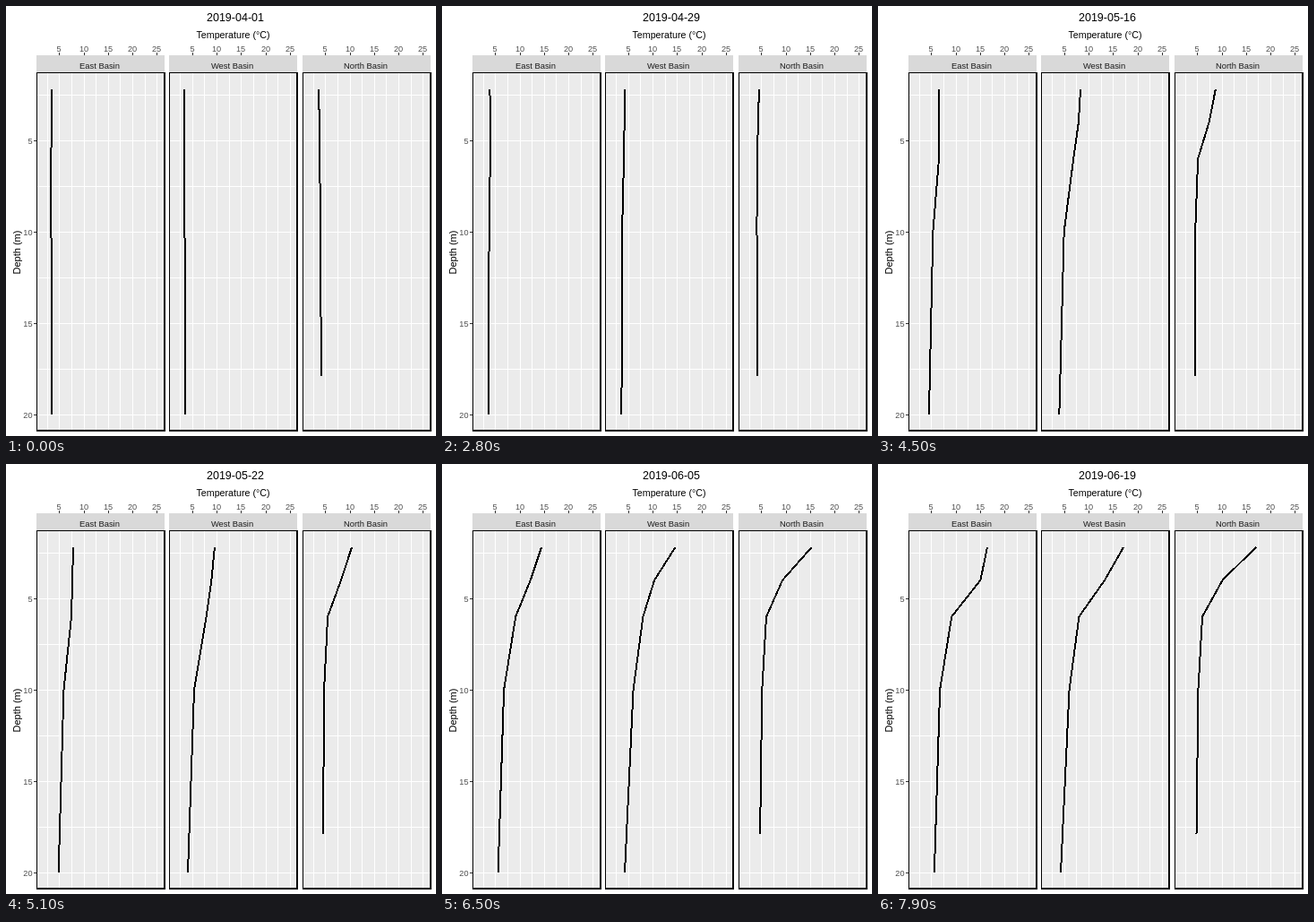
These frames come from a looping animation (480x480 px, 8000 ms). An HTML page:

```html
<!DOCTYPE html>
<html lang="en">
<head>
<meta charset="utf-8">
<title>Temperature profiles</title>
<style>
  html, body { margin: 0; width: 100%; height: 100%; overflow: hidden; background: #fff; }
  svg { display: block; width: 100vw; height: 100vh; }
  text { font-family: "Liberation Sans", Arial, sans-serif; text-anchor: middle; }
  .tick { font-size: 9.2px; fill: #4d4d4d; }
  .strip { font-size: 9.4px; fill: #1a1a1a; }
  .crisp { shape-rendering: crispEdges; }
</style>
</head>
<body>
<svg id="chart" viewBox="0 0 480 480"></svg>
<script>
const DAY_MS = 100, DAYS = 80, SPRING = 24;
const START = Date.UTC(2019, 3, 1);
const TOP = 74, BOTTOM = 475, WIDTH = 144, PER_DEGREE = 5.448;
const chart = document.getElementById("chart");

const clamp01 = value => Math.min(1, Math.max(0, value));
const lerp = (a, b, t) => a + (b - a) * t;

// Steady warming from the start of spring until the given day.
const warming = (from, to, until) => day =>
  lerp(from, to, clamp01((day - SPRING) / (until - SPRING)));

// Surface temperature on a few days, joined by straight lines.
const weatherDays = [SPRING, 38, 51, 59, 68, 71, 79];
const weather = (...temps) => day => {
  const next = Math.max(1, weatherDays.findIndex(key => key >= day));
  const from = weatherDays[next - 1];
  return lerp(temps[next - 1], temps[next], clamp01((day - from) / (weatherDays[next] - from)));
};

// Share of the surface warmth that reaches 4 m rises and falls with the wind.
const wind = (mean, swing, peak, period) => day =>
  mean + swing * Math.cos(2 * Math.PI * (day - peak) / period);

const basins = [
  { name: "East Basin", left: 34, floor: 20,
    surface: weather(3.4, 5.25, 7.9, 11.9, 15.8, 16.8, 16.5),
    mixing: wind(0.63, 0.18, 59, 20),
    at6: warming(3.38, 9.2, 62), at10: warming(3.38, 6.8, 60), atFloor: warming(3.47, 5.65, 66) },
  { name: "West Basin", left: 182, floor: 20,
    surface: weather(3.35, 6.9, 9.6, 12, 16, 17.05, 17.15),
    mixing: wind(0.54, 0.19, 43, 46),
    at6: warming(3.47, 8.05, 52), at10: warming(3.47, 6.05, 60), atFloor: warming(3.56, 4.3, 60) },
  { name: "North Basin", left: 331, floor: 17.9,
    surface: weather(3.65, 6.8, 10.45, 13.85, 16.1, 14.95, 17.05),
    mixing: wind(0.5, 0.17, 38, 66),
    at6: warming(3.9, 6.05, 60), at10: warming(4, 5.2, 66), atFloor: warming(4.2, 4.85, 70) }
];

const depthY = depth => 150 + 20.4 * (depth - 5);
const tempX = (basin, degrees) => basin.origin + PER_DEGREE * degrees;

function add(tag, attrs, content = "") {
  const node = document.createElementNS("http://www.w3.org/2000/svg", tag);
  for (const key in attrs) node.setAttribute(key, attrs[key]);
  node.textContent = content;
  return chart.appendChild(node);
}
const box = (x, y, width, height, fill) =>
  add("rect", { x, y, width, height, fill, class: "crisp" });

function drawPanel(basin, index) {
  const { left, name } = basin;
  basin.origin = 32.08 + 148.5 * index;
  box(left, 55, WIDTH - 1, TOP - 55, "#d9d9d9");
  add("text", { x: left + 70.5, y: 70, class: "strip" }, name);
  box(left, TOP, WIDTH, BOTTOM - TOP, "#ebebeb");

  for (let depth = 2.5; depth <= 20; depth += 2.5)
    box(left, Math.round(depthY(depth)), WIDTH, 1, "#fff");
  for (let degrees = 2.5; degrees <= 25; degrees += 2.5) {
    const x = Math.round(tempX(basin, degrees));
    box(x, TOP, 1, BOTTOM - TOP, "#fff");
    if (degrees % 5 === 0) {
      box(x, 52, 1, 3, "#333");
      add("text", { x, y: 51, class: "tick" }, degrees);
    }
  }

  basin.line = add("polyline", {
    fill: "none", stroke: "#000", "stroke-width": 2, "stroke-linejoin": "round", class: "crisp"
  });
  box(left, TOP, WIDTH, 1, "#000");
  box(left, TOP, 1, BOTTOM - TOP, "#000");
  box(left + WIDTH - 2, TOP, 2, BOTTOM - TOP, "#000");
  box(left, BOTTOM - 2, WIDTH, 2, "#000");
}

const title = add("text", { x: 256, y: 17, "font-size": 12.5 });
add("text", { x: 253.5, y: 36, "font-size": 10.7 }, "Temperature (°C)");
add("text", { transform: "translate(15.5 275) rotate(-90)", "font-size": 11 }, "Depth (m)");
basins.forEach(drawPanel);
for (let depth = 5; depth <= 20; depth += 5) {
  const y = Math.round(depthY(depth));
  box(31, y, 3, 1, "#333");
  add("text", { x: 29.5, y: y + 4, class: "tick", style: "text-anchor: end" }, depth);
}

function render(day) {
  title.textContent = new Date(START + day * 864e5).toISOString().slice(0, 10);
  for (const basin of basins) {
    const surface = basin.surface(day), at6 = basin.at6(day);
    const profile = [
      [2.2, surface],
      [4, lerp(at6, surface, basin.mixing(day))],
      [6, at6],
      [10, basin.at10(day)],
      [basin.floor, basin.atFloor(day)]
    ];
    const points = profile.map(([depth, temp]) => `${tempX(basin, temp)},${depthY(depth)}`);
    basin.line.setAttribute("points", points.join(" "));
  }
}

const begin = performance.now();
function tick() {
  const elapsed = Math.max(0, performance.now() - begin);
  render(Math.floor(elapsed / DAY_MS) % DAYS);
  requestAnimationFrame(tick);
}
tick();
</script>
</body>
</html>
```
